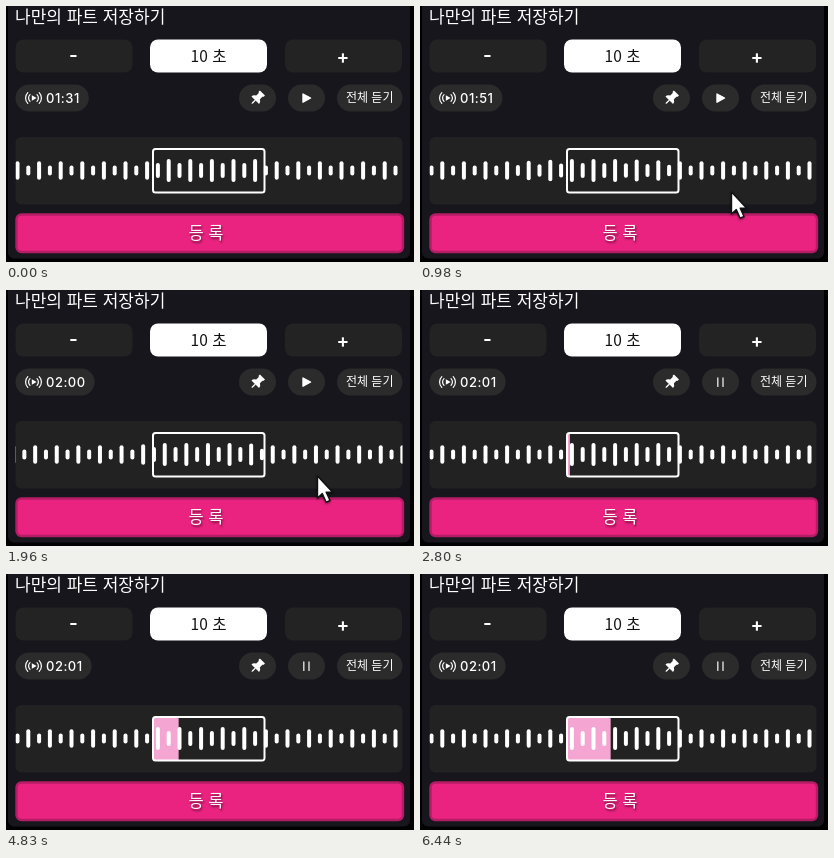
Write an HTML page that moves like this. It is 408 px wide and 256 px high and loops after 6.51 s.

```html
<!DOCTYPE html>
<html lang="ko">
<head>
<meta charset="utf-8">
<title>나만의 파트 저장하기</title>
<style>
  html, body { margin: 0; width: 100%; height: 100%; overflow: hidden; background: #000; }
  svg { display: block; width: 408px; height: 256px; }
  text { fill: #fff; font-family: "Noto Sans CJK KR", "Noto Sans CJK JP", sans-serif; font-weight: 500; }
  .mid { text-anchor: middle; }
  .sign { font: 600 19px Inter, sans-serif; }
  .time { font: 500 13px Inter, sans-serif; letter-spacing: .5px; }
  .key { fill: #232323; }
  .pill { fill: #2b2b2b; }
  .line { fill: none; stroke: #fff; stroke-width: 1.2; stroke-linecap: round; }
  .save { font-size: 16.5px; text-shadow: 1px 2px 2px rgba(60, 0, 30, .65); }
</style>
</head>
<body>
<svg viewBox="0 0 408 256">
  <defs>
    <clipPath id="track"><rect x="9.5" y="131" width="387" height="67.5" rx="6"/></clipPath>
  </defs>
  <rect x="2" y="-10" width="402" height="262.5" rx="6" fill="#17161d"/>
  <text x="9" y="17" font-size="17">나만의 파트 저장하기</text>

  <rect class="key" x="9.5" y="33.5" width="117" height="33" rx="8"/>
  <rect x="144" y="33.5" width="117" height="33" rx="8" fill="#fff"/>
  <rect class="key" x="279" y="33.5" width="117" height="33" rx="8"/>
  <text class="mid sign" x="67.5" y="56">-</text>
  <text class="mid" x="202.5" y="55.5" font-size="15.5" style="fill:#111">10 초</text>
  <text class="mid sign" x="337" y="57.4">+</text>

  <rect class="pill" id="timePill" x="9.5" y="78.5" width="74" height="27" rx="13.5"/>
  <path d="M25.8 89.2 L30.6 92 L25.8 94.8Z" fill="#fff"/>
  <path class="line" d="M24 88.6 a4.8 4.8 0 0 0 0 6.8 M31 88.6 a4.8 4.8 0 0 1 0 6.8 M21.8 86.6 a7.7 7.7 0 0 0 0 10.8 M33.2 86.6 a7.7 7.7 0 0 1 0 10.8"/>
  <text class="time" id="time" x="40" y="96.7">01:31</text>

  <rect class="pill" x="233" y="78.5" width="37" height="27" rx="13.5"/>
  <g transform="translate(251.5 92) rotate(45)" fill="#fff">
    <path d="M-3.6 -7 h7.2 v1.8 l-1 .8 v3.6 q2.8 1.4 2.8 4 h-10.8 q0 -2.6 2.8 -4 v-3.6 l-1 -.8z"/>
    <path d="M-.7 3 h1.4 v4.2 l-.7 1.2 l-.7 -1.2z"/>
  </g>

  <rect class="pill" x="282" y="78.5" width="37" height="27" rx="13.5"/>
  <path id="play" d="M297 88 L304.6 92 L297 96.2Z" fill="#fff" stroke="#fff" stroke-width="1.4" stroke-linejoin="round"/>
  <path id="pause" class="line" d="M297.8 88 v8.4 M303 88 v8.4" style="stroke:#ddd;stroke-width:1.4"/>

  <rect class="pill" x="331" y="78.5" width="65.5" height="27" rx="13.5"/>
  <text class="mid" x="363.7" y="96.4" font-size="12">전체 듣기</text>

  <rect x="9.5" y="131" width="387" height="67.5" rx="6" fill="#222"/>
  <rect id="fill" x="148" y="144" width="0" height="42" fill="#f5a5d2"/>
  <g id="bars" clip-path="url(#track)" fill="#fff"></g>
  <rect x="147" y="143" width="111.5" height="43.5" rx="2.5" fill="none" stroke="#fff" stroke-width="2"/>

  <rect x="10.5" y="208.5" width="386.5" height="37.5" rx="5" fill="#e9237f" stroke="#b51c66" stroke-width="2.4"/>
  <text class="mid save" x="200" y="232.5">등 록</text>

  <path id="cursor" d="M311.5 186 V208 L316.3 203.6 L320.2 212.2 L324 210.5 L320.2 202.2 H326.6Z"
    fill="#fff" stroke="#111" stroke-width="1.4" stroke-linejoin="round"
    style="filter:drop-shadow(0 1px 1px rgba(0,0,0,.5))"/>
</svg>
<script>
const LOOP = 6510, STEP = 70;
const GAP = 10.8, FIRST = 11.5, MID = 164.5;
const PX_PER_SEC = 11.2, START_SEC = 91.6;
const BOX = [146, 259];
const GROW_MS = 250;

// time, scroll offset, speed in px per ms
const scroll = [
  [280, 0, .48],
  [980, 21 * GAP, .165],
  [1540, 296.8, .085],
  [2100, 31 * GAP, .04],
];

const $ = id => document.getElementById(id);
const show = (id, on) => $(id).setAttribute("visibility", on ? "visible" : "hidden");

const bars = Array.from({ length: 38 }, () => {
  const bar = document.createElementNS("http://www.w3.org/2000/svg", "rect");
  bar.setAttribute("width", 4);
  bar.setAttribute("rx", 2);
  return $("bars").appendChild(bar);
});

function offsetAt(t) {
  const last = scroll[scroll.length - 1];
  if (t <= scroll[0][0]) return 0;
  if (t >= last[0]) return last[1];
  const i = scroll.findIndex(p => p[0] > t);
  const [t0, a, va] = scroll[i - 1], [t1, b, vb] = scroll[i];
  const d = t1 - t0, u = (t - t0) / d, w = 1 - u;
  return w * w * ((1 + 2 * u) * a + u * d * va) + u * u * ((3 - 2 * u) * b - w * d * vb);
}

// Bars grow and shrink with a short delay as they cross the box
function growth(home, recent) {
  const inside = recent.filter(o => home - o > BOX[0] && home - o < BOX[1]);
  return inside.length / recent.length;
}

function drawBars(t, offset) {
  const recent = Array.from({ length: 11 }, (_, i) => offsetAt(t - GROW_MS * i / 10));
  const from = Math.floor(offset / GAP + .01) - 1;
  bars.forEach((bar, i) => {
    const k = from + i, home = FIRST + k * GAP;
    const g = growth(home, recent);
    const h = k % 2 ? 10 + 5 * g : 18.5 + 4.5 * g;
    bar.setAttribute("x", home - offset - 2);
    bar.setAttribute("y", MID - h / 2);
    bar.setAttribute("height", h);
  });
}

function drawTime(offset) {
  const s = Math.floor(START_SEC + offset / PX_PER_SEC);
  const two = n => String(n).padStart(2, "0");
  $("time").textContent = two(Math.floor(s / 60)) + ":" + two(s % 60);
  $("timePill").setAttribute("width", 39.5 + $("time").getComputedTextLength());
}

function draw(t) {
  const offset = offsetAt(t);
  drawBars(t, offset);
  drawTime(offset);
  const edge = t < 2450 ? 0 : 164 + (t - 4060) * PX_PER_SEC / 1000;
  $("fill").setAttribute("width", Math.max(0, edge - 148));
  show("cursor", t >= 350 && t < 2450);
  show("play", t < 2170);
  show("pause", t >= 2170);
}

const begin = performance.now();
function tick() {
  const t = (performance.now() - begin) % LOOP;
  draw(Math.floor(t / STEP) * STEP);
  requestAnimationFrame(tick);
}
tick();
</script>
</body>
</html>
```
